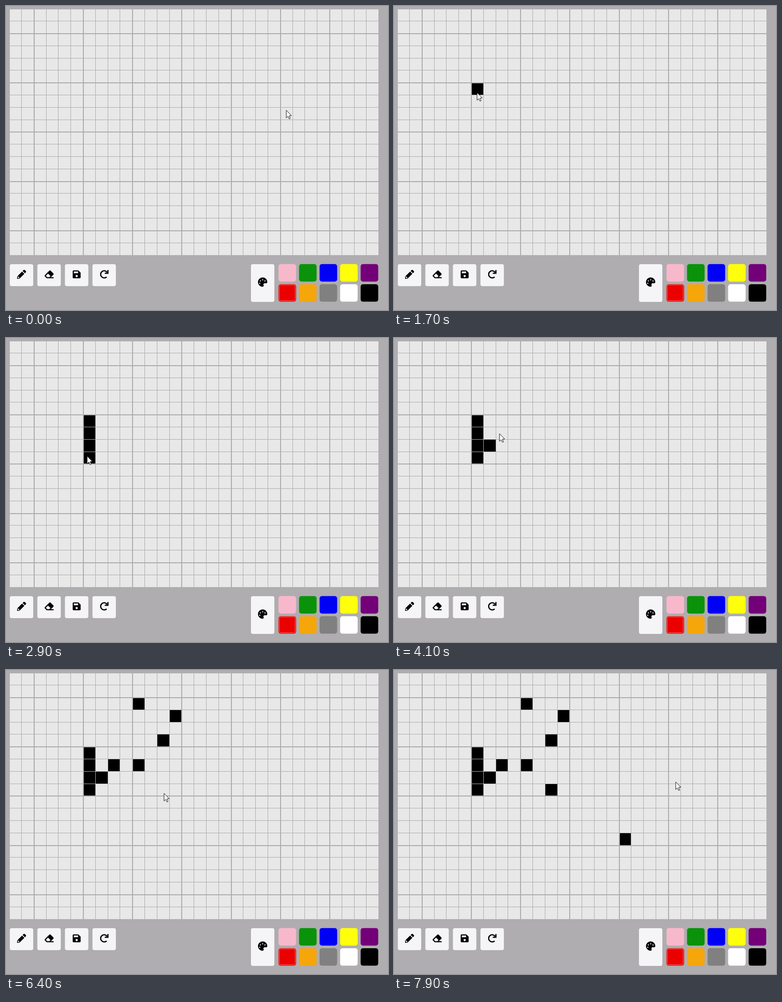
Write an HTML page with a canvas that moves like this. It is 800 by 637 pixels and loops after 8 s.

```html
<!DOCTYPE html>
<html lang="en">
<head>
<meta charset="utf-8">
<title>Pixel editor</title>
<style>
html, body { margin: 0; width: 100%; height: 100%; overflow: hidden; background: #afadaf; }
canvas { display: block; width: 800px; height: 637px; }
</style>
</head>
<body>
<canvas id="stage" width="800" height="637"></canvas>
<script>
const ctx = document.getElementById('stage').getContext('2d');
const LOOP = 8000, STEP = 100, HOLD = 100, PITCH = 25.8;
const COLS = 30, ROWS = 20;
const BOARD = { x: 8, y: 7, w: 772, h: 515 };
const BUTTON = '#f5f5f7';
const toX = col => 6.2 + PITCH * col;
const toY = row => 5.4 + PITCH * row;

// Each click paints the cell under the pointer; positions are in cells.
const clicks = [
  { t: 1600, col: 6.5, row: 6.8 },
  { t: 2000, col: 6.5, row: 7.5 },
  { t: 2400, col: 6.5, row: 8.5 },
  { t: 2800, col: 6.35, row: 9.36 },
  { t: 3500, col: 7.5, row: 8.5 },
  { t: 4200, col: 8.33, row: 7.54 },
  { t: 4700, col: 10.5, row: 2.5 },
  { t: 5300, col: 13.29, row: 3.16 },
  { t: 5700, col: 12.5, row: 5.5 },
  { t: 6000, col: 10.5, row: 7.5 },
  { t: 6500, col: 12.59, row: 9.79 },
  { t: 7300, col: 18.5, row: 13.5 }
];
const stops = [{ t: 0, col: 22.51, row: 8.24 }, ...clicks, { t: LOOP, col: 22.63, row: 8.86 }];

const palette = [
  ['#f8b8cb', '#0a930a', '#0000f5', '#ffff0c', '#730078'],
  ['#eb0000', '#f5a60a', '#808080', '#ffffff', '#000000']
];

const disc = (x, y, r) => `M${x - r} ${y}a${r} ${r} 0 1 0 ${2 * r} 0a${r} ${r} 0 1 0 ${-2 * r} 0z`;

// Icons are drawn in a 512 unit square.
const icons = {
  pencil: 'M284 100L22 362 0 484q0 28 28 28l122-21 262-262z' +
    'M498 142l-54 54L316 68l54-54q34-28 68 0l60 60q28 34 0 68z' +
    'M88 424h48v36l-65 12-31-31 12-65h36z',
  eraser: 'M498 274q28-34 0-68L338 46q-34-28-68 0L14 302q-28 34 0 68l96 96q14 14 34 14h368v-64H356z' +
    'M195 211l138 138-67 67H151l-80-80z',
  disk: 'M80 32h268l132 130v270q0 48-48 48H80q-48 0-48-48V80q0-48 48-48z' +
    'M96 96h240v96H96z' + disc(256, 352, 64),
  palette: 'M204 5C105 24 25 104 5 203c-37 187 132 327 259 307 41-6 61-55 42-92-23-45 10-98 61-98h80' +
    'c36 0 65-30 65-65C511 97 368-27 204 5z' +
    disc(96, 320, 32) + disc(128, 192, 32) + disc(256, 128, 32) + disc(384, 192, 32),
  redo: 'M400 411A212 212 0 1 1 438 146M476 0V188H288'
};

function box(x, y, w, h, r, color) {
  ctx.fillStyle = color;
  ctx.beginPath();
  ctx.roundRect(x, y, w, h, r);
  ctx.fill();
}

function drawIcon(name, x, y, size) {
  const shape = new Path2D(icons[name]);
  ctx.save();
  ctx.translate(x - size / 2, y - size / 2);
  ctx.scale(size / 512, size / 512);
  ctx.fillStyle = ctx.strokeStyle = '#000';
  ctx.lineWidth = 72;
  if (name === 'redo') ctx.stroke(shape);
  else ctx.fill(shape, 'evenodd');
  ctx.restore();
}

function drawBoard(t) {
  const { x, y, w, h } = BOARD;
  box(x, y, w, h, 0, '#e8e8e8');
  ctx.fillStyle = '#000';
  for (const click of clicks) {
    if (t < click.t) continue;
    const col = Math.floor(click.col), row = Math.floor(click.row);
    ctx.fillRect(Math.round(toX(col)), Math.round(toY(row)), 26, 26);
  }
  ctx.fillStyle = '#acabad';
  const weight = i => i % 4 === 2 ? 2 : 1;
  for (let i = 1; i < COLS; i++) ctx.fillRect(Math.round(toX(i)), y, weight(i), h);
  for (let j = 1; j < ROWS; j++) ctx.fillRect(x, Math.round(toY(j)), w, weight(j));
}

function drawTools() {
  ['pencil', 'eraser', 'disk', 'redo'].forEach((name, i) => {
    const x = 8 + 57.7 * i;
    box(x, 541, 49, 46, 4, BUTTON);
    drawIcon(name, x + 24.6, 562.3, name === 'redo' ? 18 : 19);
  });
  box(513, 541, 49, 79, 4, BUTTON);
  drawIcon('palette', 537.5, 578.5, 19.5);

  palette.forEach((colors, r) => colors.forEach((color, c) => {
    box(570.7 + 43 * c, 540.8 + 42.2 * r, 36.8, 36.6, 5, color);
  }));
  // focus ring on the red swatch
  ctx.strokeStyle = 'rgba(255,255,255,.4)';
  ctx.lineWidth = 1;
  ctx.beginPath();
  ctx.roundRect(572.5, 584.5, 33, 33, 3);
  ctx.stroke();
}

function pointerAt(t) {
  const k = stops.findIndex(s => s.t > t);
  const a = stops[k - 1], b = stops[k];
  const start = a.t + HOLD, end = b.t - HOLD;
  const u = Math.min(1, Math.max(0, (t - start) / (end - start)));
  const e = u * u * (3 - 2 * u);
  return [toX(a.col + (b.col - a.col) * e), toY(a.row + (b.row - a.row) * e)];
}

function drawPointer(t) {
  const [x, y] = pointerAt(t);
  const arrow = new Path2D('M0 0V16L3.6 12.6 6 18 8.4 17 6.1 11.6 10.8 11.2z');
  ctx.save();
  ctx.translate(Math.round(x), Math.round(y) + 0.5);
  ctx.fillStyle = '#fff';
  ctx.strokeStyle = '#111';
  ctx.lineWidth = 1;
  ctx.fill(arrow);
  ctx.stroke(arrow);
  ctx.restore();
}

function frame(now) {
  const t = Math.floor((now % LOOP) / STEP) * STEP;
  box(0, 0, 800, 637, 0, '#afadaf');
  drawBoard(t);
  drawTools();
  drawPointer(t);
  requestAnimationFrame(frame);
}
requestAnimationFrame(frame);
</script>
</body>
</html>
```
